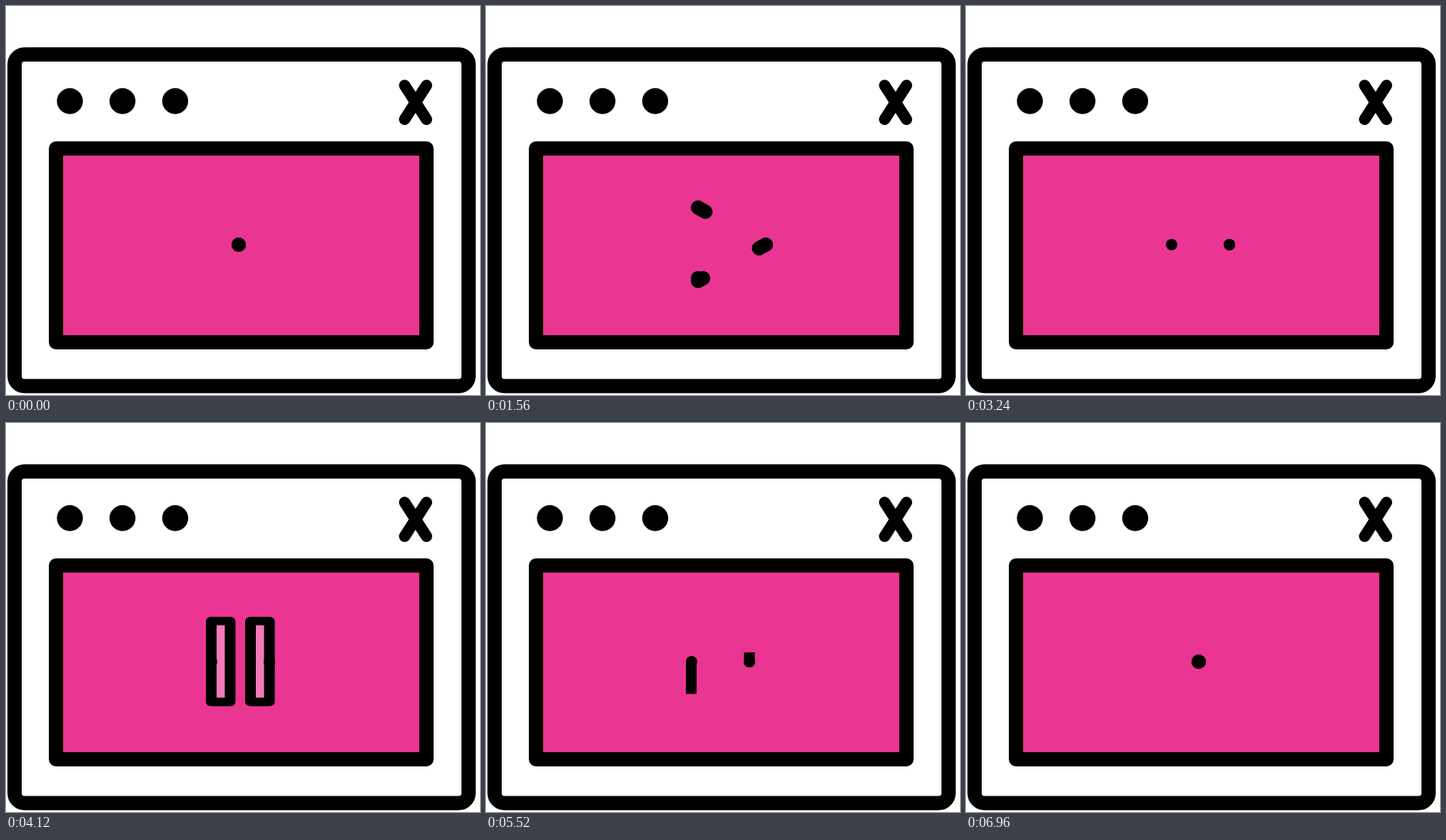
An HTML page for the animation above (7 s loop, 664 by 546 pixels).

```html
<!DOCTYPE html>
<html lang="en">
<head>
<meta charset="utf-8">
<title>Play and pause</title>
<style>
  html, body { margin: 0; width: 100%; height: 100%; overflow: hidden; background: #fff; }
  svg { display: block; width: 100vw; height: 100vh; }
  .line { fill: none; stroke: #000; stroke-linejoin: round; }
  .tint { fill: #f17bb8; }
</style>
</head>
<body>
<svg viewBox="0 0 664 546">
  <rect class="line" x="12" y="68" width="636" height="465.5" rx="14" stroke-width="20"/>
  <circle cx="89.5" cy="133.5" r="18.2"/>
  <circle cx="163.2" cy="133.5" r="18.2"/>
  <circle cx="237" cy="133.5" r="18.2"/>
  <path class="line" d="M558.5 111.5 589 159M589 111.5 558.5 159" stroke-width="16" stroke-linecap="round"/>
  <rect x="70" y="200" width="519" height="272" fill="#eb3592" stroke="#000" stroke-width="20" stroke-linejoin="round"/>

  <g id="play">
    <path class="tint" d="M297 283V386L392 335Z"/>
    <g stroke-width="20" stroke-linecap="round">
      <path class="line" pathLength="1" d="M297 283V386L304 382.2"/>
      <path class="line" pathLength="1" d="M304 382.2 392 335"/>
      <path class="line" pathLength="1" d="M392 335 297 283"/>
    </g>
  </g>

  <g id="pause" transform="translate(0 67) scale(1 .8)">
    <path class="tint" d="M287.5 263.75H314V405.6H287.5ZM342.5 263.75H369V405.6H342.5Z"/>
    <g stroke-width="15">
      <path class="line" pathLength="1" d="M287.5 335V263.75H314V405.6H287.5Z"/>
      <path class="line" pathLength="1" d="M369 335V405.6H342.5V263.75H369Z"/>
    </g>
  </g>

  <g id="dots"><circle/><circle/><circle/></g>
</svg>
<script>
  const LOOP = 7000;
  const CENTER = [326, 335];
  const PLAY_DOTS = [[297, 283], [304, 382.2], [392, 335]];
  const PAUSE_DOTS = [[288, 335], [369, 335], [369, 335]];

  const all = selector => [...document.querySelectorAll(selector)];
  const playLines = all('#play .line');
  const pauseLines = all('#pause .line');
  const [playTint, pauseTint] = all('.tint');
  const dots = all('#dots circle');

  const progress = (t, start, end) => Math.min(1, Math.max(0, (t - start) / (end - start)));
  const ease = p => p * p * (3 - 2 * p);
  const mix = (a, b, p) => a + (b - a) * p;

  // Show the part of a path between two fractions of its length.
  function trim(path, from, to) {
    const visible = to - from > 0.0005;
    path.style.display = visible ? '' : 'none';
    if (!visible) return;
    const whole = from === 0 && to === 1;
    path.setAttribute('stroke-dasharray', whole ? 'none' : `${to - from} 2`);
    path.setAttribute('stroke-dashoffset', -from);
  }

  function moveDots(targets, spread, radius) {
    dots.forEach((dot, i) => {
      dot.setAttribute('cx', mix(CENTER[0], targets[i][0], spread));
      dot.setAttribute('cy', mix(CENTER[1], targets[i][1], spread));
      dot.setAttribute('r', mix(10, radius, spread));
    });
  }

  function render(t) {
    playLines.forEach((line, i) => {
      const lead = i === 0 ? 40 : 0;
      trim(line, progress(t, 1200, 1605), progress(t, 280 - lead, 680 - lead));
    });
    playTint.style.opacity = progress(t, 400, 540) - progress(t, 1240, 1440);

    pauseLines.forEach((line, i) => {
      const lag = i === 0 ? 86 : 0;
      trim(line, progress(t, 4836 + lag, 5556 + lag), progress(t, 3260, 4000));
    });
    pauseTint.style.opacity = progress(t, 3700, 4000) - progress(t, 4900, 5200);

    if (t < 2400) {
      moveDots(PLAY_DOTS, ease(progress(t, 0, 260)) - ease(progress(t, 1620, 1900)), 10);
    } else {
      moveDots(PAUSE_DOTS, ease(progress(t, 2940, 3220)) - ease(progress(t, 5660, 5940)), 8);
    }
  }

  const start = performance.now();
  function tick() {
    render((performance.now() - start) % LOOP);
    requestAnimationFrame(tick);
  }
  tick();
</script>
</body>
</html>
```
